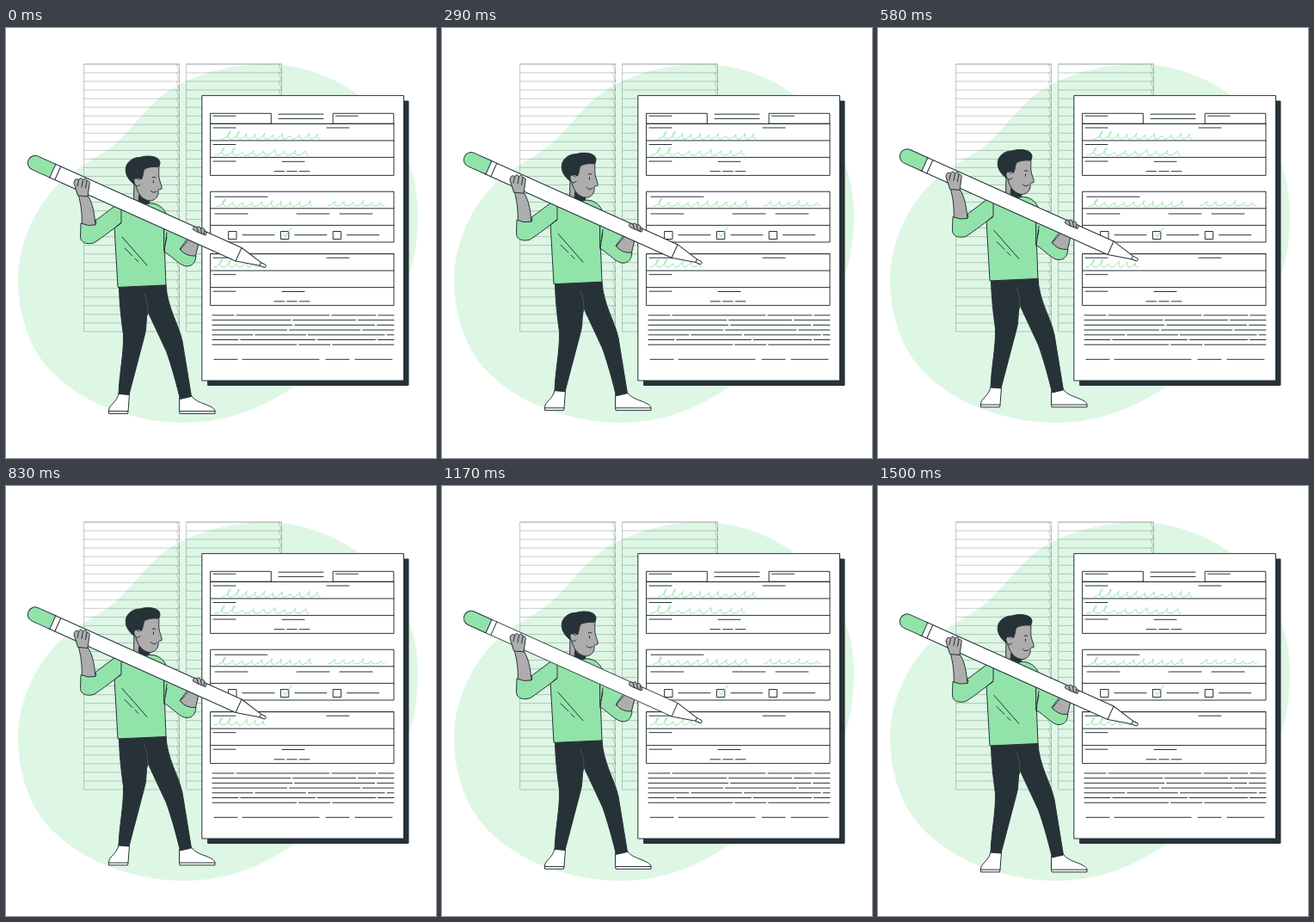
An HTML page that plays this animation: 500 by 500 pixels, repeating every 1540 ms.

```html
<!DOCTYPE html>
<html lang="en">
<head>
<meta charset="utf-8">
<title>Filling in a form</title>
<style>
  html, body { margin: 0; width: 100%; height: 100%; overflow: hidden; background: #fff; }
  svg { display: block; width: 100vw; height: 100vh; }
  path, rect { stroke-linecap: round; stroke-linejoin: round; }
  .ln { fill: none; stroke: #263238; }
  .ink { fill: none; stroke: #92e3a9; }
  .green, .skin, .white, .dark { stroke: #263238; }
  .green { fill: #92e3a9; }
  .skin { fill: #adadad; }
  .white { fill: #fff; }
  .dark { fill: #263238; }
</style>
</head>
<body>
<svg viewBox="0 0 500 500">
  <path fill="#92e3a9" opacity=".3" d="M14 292C14 248 38 196 78 167C98 153 112 148 130 132C152 112 166 87 194 70C222 53 262 42 302 42C352 42 400 64 432 97C462 129 479 172 479 216C479 250 474 283 458 313C436 352 384 385 338 415C304 438 262 459 208 459C150 459 84 437 46 392C25 366 14 330 14 292Z"/>
  <path id="stacks" class="ln" opacity=".25"/>

  <rect class="dark" x="235" y="85" width="233" height="330.500"/>
  <rect class="white" x="228.200" y="78.600" width="234.300" height="331.400"/>
  <path id="form" class="ln"/>
  <path id="script" class="ink"/>
  <path class="ink" d="M322 239L325 243Q328 236 332 232"/>

  <g id="man">
    <!-- legs and shoes -->
    <path class="white" d="M131 425C129 436 119 438 119.500 445.600V448.400H141.500L142 445.600L143.500 426Z"/>
    <path class="white" d="M202 430L216 428C221 437 242 438 243 445.600V448.400H202L201.500 445Z"/>
    <path class="ln" d="M119.500 445.600H142M202 445.600H243"/>
    <path class="dark" d="M131.500 301L186 298C187 324 201 345 205 364L215.500 428.500L202.500 431.500C197 408 189 382 186 375L165 330C162 338 164 350 161 358L143 426.500L131 425.500C132 400 137 380 136.500 357C134 338 132 322 131.500 301Z"/>
    <path d="M165 331Q165 318 161 309" fill="none" stroke="#68736f" stroke-width=".5"/>

    <!-- neck and head -->
    <path class="skin" d="M149 176L148.500 206L166 212L167 196Z"/>
    <path class="dark" d="M155 194Q159 201 167 200L165 210L154 204Z"/>
    <path class="skin" d="M154 160L178 158C178 167 177 172 179 178C180 182 182 185 181 187C180 188 177 187 177 189C178 195 174 201 167 201C160 200 154 195 151 184Z"/>
    <path class="dark" d="M149.500 182C142 177 138 169 139.500 162C141 155 149 150 156 150.500C162 148 178 148 179 156C179 161 177 162 175 161.500C170 161 165 162 161 164C159 168 160 171 157.500 176L154 174L150 176Z"/>
    <path class="skin" d="M155 177C152 173 148 175 149 179C150 184 154 185 156 182"/>
    <path class="ln" d="M170 174Q172 172 174 174M171.500 177.500V180M168 189Q171 193 175 190"/>

    <!-- torso and arms -->
    <path class="green" d="M126 206L148 200Q156 209 166 204C176 203 184 209 187 218L183.500 235L186 299L130 301.500L126 230Z"/>
    <path class="skin" d="M79 181L84 193C87 205 89 216 88 231L104 231C103 216 101 204 95 195L97 181Z"/>
    <path class="green" d="M128 206L104 224Q106 227 104 229Q95 231 87 227L86.500 243C87 250 94 252 102 250C110 245 119 238 127 232L134 226V208Z"/>
    <path class="ln" d="M127 232L134 227"/>
    <path class="skin" d="M216 242L203 257L207 266L220 267L224 250Z"/>
    <path class="green" d="M184 222L211 245L202 257Q209 266 221 265C220 273 217 277 210 277C203 277 195 267 184 260Z"/>
    <path class="ln" d="M187 238L184 261M187 243L185 252M135 243L164 276M138 256L147 265M150 268L154 272"/>

    <!-- pen -->
    <g transform="translate(302 277.400) rotate(24.200)">
      <path class="white" d="M-273 -8.500H-34.500L-7 -2L-1 -1.700Q1 0 -1 1.700L-7 2L-34.500 8.500H-273Z"/>
      <path class="green" d="M-271.500 -8.500H-294A8.500 8.500 0 0 0 -294 8.500H-271.500Z"/>
      <path class="ln" d="M-265 -8.500V8.500M-34.500 -8.500V8.500M-7 -2V2"/>
    </g>

    <!-- hands on the pen -->
    <path class="skin" d="M79 180C79 176 83 174 84.500 177C85 174 89 174 89.500 177C91 174 94 175 94 178C96 177 98 179 97 182L95 196L84 195Z"/>
    <path class="ln" d="M84.500 177L83 184M89.500 177L88 185M94 178L92.500 186"/>
    <path class="skin" d="M217.500 234C217 231 220 230 222 232C223 230 226 231 226.500 233C229 232 231 233 231 236C233 236 234 238 232 241L222 237Z"/>
    <path class="ln" d="M222 232L223.500 237M226.500 233L227.500 239M231 236L230 240"/>
  </g>
</svg>
<script>
  const LOOP = 1540, TOP_AT = 705, LIFT = 10;
  const LEFT = 238, RIGHT = 451, LABEL = 26;
  const byId = id => document.getElementById(id);
  const setPath = (id, d) => byId(id).setAttribute('d', d);
  const rule = (x, y, w) => `M${x} ${y}h${w}`;
  const box = (x, y, w, h) => `M${x} ${y}h${w}v${h}h${-w}Z`;

  let seed = 7;
  const rand = () => (seed = seed * 16807 % 2147483647) / 2147483647;

  // A pile of sheets with slanted right ends
  function pile(x) {
    const rows = 31, h = 311 / rows, w = 110.5;
    let d = box(x, 42, w, 311);
    for (let i = 0; i < rows; i++) {
      const y = 42 + i * h;
      d += rule(x, y, w) + `M${x + w - 3} ${y}l3 ${h}`;
    }
    return d;
  }

  // A panel of three rows with labels and a dashed date
  function panel(top) {
    let d = box(LEFT, top, RIGHT - LEFT, 60) + rule(373, top + 4.6, LABEL) + rule(321, top + 43.9, LABEL);
    for (let i = 0; i < 3; i++) {
      const y = top + i * 19.5;
      d += rule(LEFT, y, RIGHT - LEFT) + rule(241, y + 4.6, LABEL) + rule(312 + i * 14.7, top + 55.3, 11.5);
    }
    return d;
  }

  function header(y) {
    let d = '';
    for (const x of [LEFT, 380.5]) d += box(x, y, 70.3, 12) + rule(x + 3, y + 2.9, LABEL);
    return d + rule(317, y + 0.9, 52) + rule(317, y + 6.1, 52);
  }

  function choices(top) {
    const row = 19.6;
    let d = box(LEFT, top, RIGHT - LEFT, row * 3) + rule(243, top + 6, 61);
    for (let i = 1; i < 3; i++) d += rule(LEFT, top + i * row, RIGHT - LEFT);
    for (const x of [243, 338, 388]) d += rule(x, top + 25.8, 38);
    for (let i = 0; i < 3; i++) {
      const x = 259 + i * 60.8;
      d += box(x, top + 46.3, 9, 9) + rule(x + 16, top + 50.5, 37);
    }
    return d;
  }

  // Lines of words broken at random places
  function paragraph(top) {
    let d = '';
    for (let i = 0; i < 7; i++) {
      for (let x = 240; x < RIGHT - 5;) {
        const w = Math.min(25 + rand() * 90, RIGHT - x);
        d += rule(x, top + i * 5.7, w);
        x += w + 3;
      }
    }
    return d;
  }

  // Cursive line: tall loops first, then low uneven waves
  function scrawl(x0, x1, base, letters, loops) {
    const step = (x1 - x0) / letters, fine = 14;
    let d = '';
    for (let i = 0; i < letters; i++) {
      const loop = i < loops;
      const h = loop ? 9 : 3.5 + rand() * 3.5;
      const swing = step * (loop ? 0.28 : 0.1 + rand() * 0.12);
      for (let k = 0; k < fine; k++) {
        const a = 2 * Math.PI * k / fine;
        const up = h * (1 - Math.cos(a)) / 2;
        const x = x0 + step * (i + k / fine) + swing * Math.sin(a) + up * 0.5;
        d += `${d ? 'L' : 'M'}${x.toFixed(1)} ${(base - up).toFixed(1)}`;
      }
    }
    return d + `L${x1} ${base - 1}`;
  }

  setPath('stacks', pile(91) + pile(210));
  setPath('form', header(99.3) + panel(111.4) + choices(190.2) + panel(262.6) + paragraph(334)
    + rule(242, 385.3, 27) + rule(275, 385.3, 89) + rule(372, 385.3, 27) + rule(406, 385.3, 43));
  setPath('script', scrawl(251, 365, 129, 11, 2) + scrawl(243, 352, 148, 9, 2)
    + scrawl(245, 356, 207.5, 10, 1) + scrawl(374, 440, 207, 6, 0) + scrawl(242, 302, 278, 6, 2));

  // Linear float up and down
  const man = byId('man');
  function draw(ms) {
    const gap = Math.abs(ms % LOOP - TOP_AT);
    const low = Math.min(gap, LOOP - gap) / (LOOP / 2);
    man.setAttribute('transform', `translate(0 ${(0.84 - LIFT * (1 - low)).toFixed(3)})`);
  }

  const start = performance.now();
  function tick() {
    draw(performance.now() - start);
    requestAnimationFrame(tick);
  }
  tick();
</script>
</body>
</html>
```
